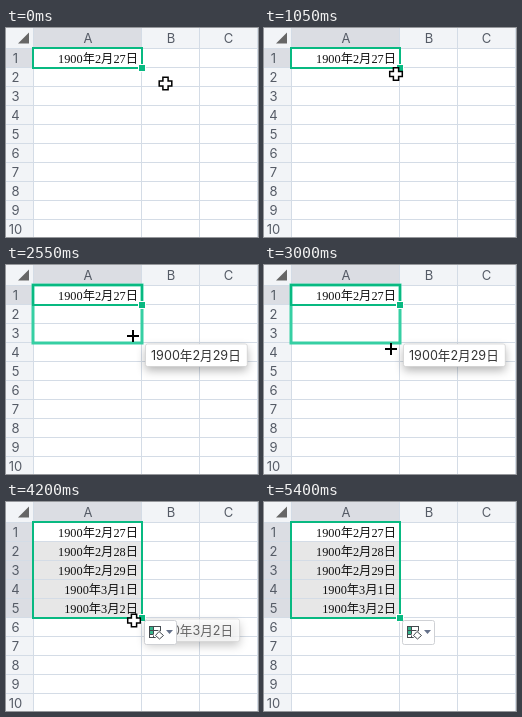
An HTML page with a canvas for the animation above (6 s loop, 252 px wide and 209 px high).

```html
<!DOCTYPE html>
<html lang="zh-CN">
<head>
<meta charset="utf-8">
<style>
  html, body { margin: 0; width: 100%; height: 100%; overflow: hidden; background: #fff; }
  canvas { display: block; width: 252px; height: 209px; }
</style>
</head>
<body>
<canvas id="stage"></canvas>
<script>
const W = 252, H = 209, LOOP = 6000, STEP = 150;
const DRAG = 1950, RELEASE = 4200, CURSOR_OUT = 5400;
const GREEN = '#08b981', RANGE_GREEN = '#36cfa3';
const SERIF = '12.3px "Liberation Serif", "Noto Sans CJK SC", serif';
const SANS = '12.6px Inter, "Noto Sans CJK SC", sans-serif';
const HEAD = '13px Inter, sans-serif';
const DATES = ['1900年2月27日', '1900年2月28日', '1900年2月29日', '1900年3月1日', '1900年3月2日'];

const canvas = document.getElementById('stage');
const ctx = canvas.getContext('2d');
const dpr = window.devicePixelRatio || 1;
canvas.width = W * dpr;
canvas.height = H * dpr;

// Pointer path: time, x, y
const PATH = [
  [150, 159.5, 55.5], [450, 145, 54], [750, 125, 50.5], [900, 121.5, 48],
  [1050, 132, 46], [1200, 132, 45.5], [1350, 133, 43], [1500, 133, 41],
  [1800, 133, 41], [1950, 132, 44], [2100, 132, 49], [2250, 131, 55],
  [2550, 127, 71], [2850, 127, 82], [3000, 127, 84], [3300, 126, 92],
  [3600, 126, 104], [3900, 126, 114], [4050, 126, 117], [4350, 130, 120],
  [4500, 146, 128], [4950, 257, 196.5], [5250, 257, 205]
];

const rowBottom = row => 21 + 19 * row;
const rowMiddle = row => 11 + 19 * row;

function pointerAt(t) {
  const i = PATH.findIndex(p => p[0] >= t);
  if (i < 0) return PATH[PATH.length - 1].slice(1);
  if (i === 0) return PATH[0].slice(1);
  const [t0, x0, y0] = PATH[i - 1], [t1, x1, y1] = PATH[i];
  const k = (t - t0) / (t1 - t0);
  return [x0 + (x1 - x0) * k, y0 + (y1 - y0) * k];
}

function rect(x, y, w, h, color) {
  ctx.fillStyle = color;
  ctx.fillRect(x, y, w, h);
}

function label(text, x, y, font, color, align = 'center') {
  ctx.font = font;
  ctx.fillStyle = color;
  ctx.textAlign = align;
  ctx.textBaseline = 'alphabetic';
  ctx.fillText(text, x, y);
}

function polygon(points, color) {
  ctx.beginPath();
  points.forEach(([x, y]) => ctx.lineTo(x, y));
  ctx.closePath();
  ctx.fillStyle = color;
  ctx.fill();
}

function drawSheet(selectedRows) {
  rect(0, 0, W, H, '#fff');
  rect(0, 0, W, 20, '#f2f4f7');
  rect(0, 0, 27, H, '#f2f4f7');
  rect(28, 0, 108, 20, '#dbdde3');
  rect(0, 21, 27, 19 * selectedRows, '#dbdde3');
  if (selectedRows > 1) rect(28, 40, 108, 19 * (selectedRows - 1), '#e7e7e7');

  const line = '#d4dce6';
  for (let row = 0; row < 10; row++) rect(0, rowBottom(row) - 1, W, 1, line);
  for (const x of [27, 135, 193, 251]) rect(x, 0, 1, H, line);
  polygon([[23, 4.5], [23, 15.5], [12, 15.5]], '#666');

  ['A', 'B', 'C'].forEach((name, i) => label(name, [82, 165, 222.5][i], 14.5, HEAD, '#555b66'));
  for (let row = 1; row <= 10; row++) label(row, 9.5, rowMiddle(row) + 5, HEAD, '#555b66');
  for (let row = 1; row <= selectedRows; row++) {
    label(DATES[row - 1], 132, rowMiddle(row) + 5, SERIF, '#111', 'right');
  }
}

function drawBorder(rows, color, width = 2) {
  ctx.strokeStyle = color;
  ctx.lineWidth = width;
  ctx.strokeRect(27, 20, 109, 19 * rows + 1);
}

function drawHandle(rows) {
  const y = rowBottom(rows);
  rect(132, y - 4, 8, 8, '#fff');
  rect(133, y - 3, 6, 6, GREEN);
}

function drawTooltip(row, alpha) {
  const text = DATES[row - 1], y = rowBottom(row) + 1;
  ctx.save();
  ctx.globalAlpha = alpha;
  ctx.font = SANS;
  const width = ctx.measureText(text).width + 12;
  ctx.beginPath();
  ctx.roundRect(139.5, y, width, 22.5, 2);
  ctx.shadowColor = 'rgba(0,0,0,.3)';
  ctx.shadowBlur = 10 * dpr;
  ctx.shadowOffsetY = 4 * dpr;
  ctx.fillStyle = '#fff';
  ctx.fill();
  ctx.shadowColor = 'transparent';
  ctx.strokeStyle = '#cfcfcf';
  ctx.lineWidth = 0.7;
  ctx.stroke();
  label(text, 145, y + 16, SANS, '#333', 'left');
  ctx.restore();
}

function drawFillButton() {
  ctx.beginPath();
  ctx.roundRect(138.5, 118.5, 32, 24, 2);
  ctx.fillStyle = '#fff';
  ctx.fill();
  ctx.strokeStyle = '#cfd1d5';
  ctx.lineWidth = 1;
  ctx.stroke();

  ctx.strokeStyle = '#454b50';
  ctx.strokeRect(143.5, 124.5, 11, 11);
  rect(144, 125, 4, 10, '#fff');
  rect(143, 128, 12, 1, '#454b50');
  rect(143, 132, 6, 1, '#454b50');
  rect(147, 124, 1, 12, '#454b50');
  rect(144, 125, 3, 3, '#35b58b');
  rect(144, 129, 3, 3, '#35b58b');
  polygon([[153, 128], [159, 133], [153, 138.5], [147, 133]], '#fff');
  ctx.beginPath();
  ctx.moveTo(153, 129.5);
  ctx.lineTo(157.5, 133.5);
  ctx.lineTo(153.5, 137);
  ctx.lineTo(149.5, 133.5);
  ctx.closePath();
  ctx.stroke();
  polygon([[160, 128], [167, 128], [163.5, 132]], '#65718a');
}

function drawPlus(x, y, hollow) {
  if (!hollow) {
    rect(x - 6, y - 1, 12, 2, '#000');
    rect(x - 1, y - 6, 2, 12, '#000');
    return;
  }
  const long = 6.3, short = 2.6;
  ctx.save();
  ctx.translate(x, y);
  ctx.beginPath();
  for (let i = 0; i < 4; i++) {
    ctx.lineTo(-short, -short);
    ctx.lineTo(-short, -long);
    ctx.lineTo(short, -long);
    ctx.rotate(Math.PI / 2);
  }
  ctx.closePath();
  ctx.fillStyle = '#fff';
  ctx.strokeStyle = '#000';
  ctx.lineWidth = 1.5;
  ctx.fill();
  ctx.stroke();
  ctx.restore();
}

function draw(t) {
  const [x, y] = pointerAt(t);
  const released = t >= RELEASE;
  const dragging = t >= DRAG && !released;
  const rows = released ? 5 : 1;
  const target = dragging ? Math.min(5, Math.floor((y - 13) / 19)) : 1;

  ctx.setTransform(dpr, 0, 0, dpr, 0, 0);
  drawSheet(rows);
  if (target > 1) drawBorder(target, RANGE_GREEN, 3);
  drawBorder(rows, GREEN);
  drawHandle(rows);
  if (target > 1) drawTooltip(target, 1);

  if (released) {
    const fade = 0.75 - (t - RELEASE) / 150 * 0.55;
    if (fade > 0) drawTooltip(5, fade);
    drawFillButton();
  }
  if (t < CURSOR_OUT) drawPlus(x, y, t < 1350 || released);
}

function tick(now) {
  draw(Math.floor(now % LOOP / STEP) * STEP);
  requestAnimationFrame(tick);
}
requestAnimationFrame(tick);
</script>
</body>
</html>
```
